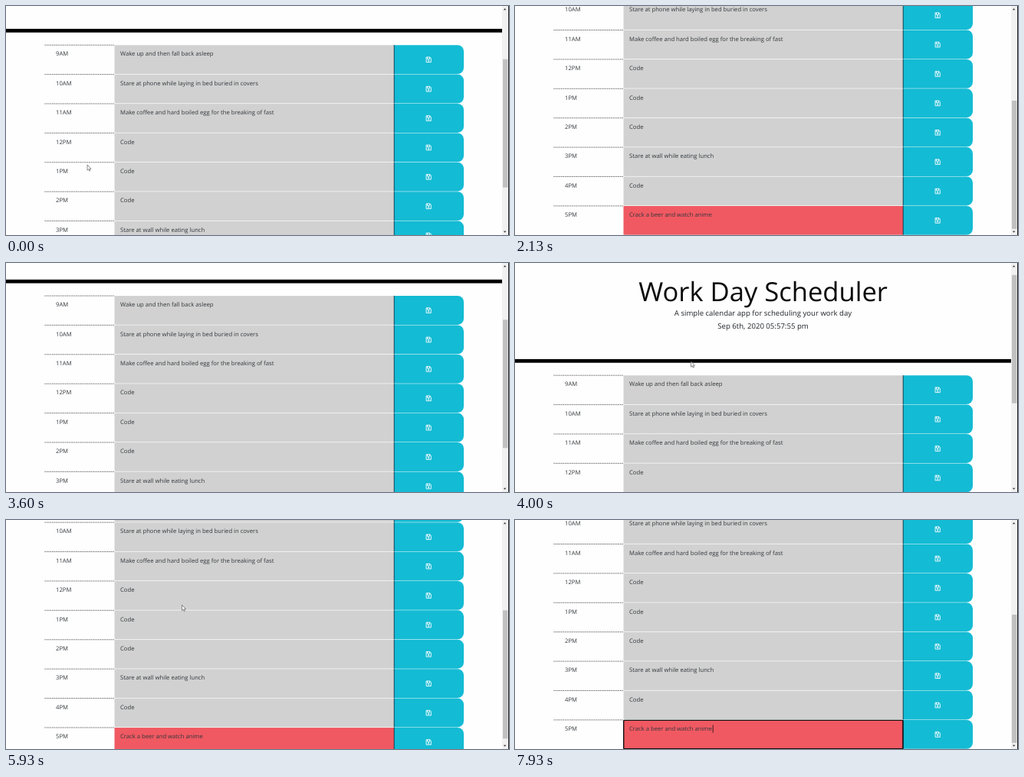
Write an HTML page that moves like this. It is 656 by 300 pixels and loops after 8000 ms.

```html
<!DOCTYPE html>
<html lang="en">
<head>
<meta charset="utf-8">
<title>Work Day Scheduler</title>
<style>
  html, body { margin: 0; width: 100%; height: 100%; overflow: hidden; background: #fefefe; }
  svg { display: block; }
  text { font: 7.68px "Open Sans", sans-serif; fill: #33373b; text-rendering: geometricPrecision; }
  .mid { text-anchor: middle; font-size: 9.6px; fill: #212529; }
  .title { font-size: 34.56px; fill: #0a0a0a; }
</style>
</head>
<body>
<svg width="656" height="300" viewBox="0 0 656 300">
  <defs>
    <g id="save" fill="none" stroke="#fff" stroke-width=".9">
      <path d="M-3.1-3.3H1.7L3.1-1.9V3.3H-3.1Z" stroke-linejoin="round"/>
      <path d="M-1.7-3.2V-.9H1.3V-3.2"/>
      <circle cy="1.2" r=".8"/>
    </g>
  </defs>
  <g id="page">
    <text class="mid title" x="323.5" y="-97">Work Day Scheduler</text>
    <text class="mid" x="323.5" y="-78">A simple calendar app for scheduling your work day</text>
    <text class="mid" x="323.5" y="-60.8" id="clock"></text>
    <rect y="-21" width="647" height="4.8"/>
    <g id="rows"></g>
    <g id="focus" transform="translate(0 307.2)">
      <rect x="141.7" y=".8" width="364.2" height="37.2" rx="1" fill="none" stroke="#111" stroke-width="1.4"/>
      <path id="caret" d="M258.2 7V17" stroke="#111" stroke-width=".8"/>
    </g>
  </g>
  <rect x="647" width="9" height="300" fill="#f1f1f1"/>
  <rect id="thumb" x="648" width="6.3" height="168" fill="#c1c1c1"/>
  <path d="M648.8 5.2L650.6 3L652.4 5.2ZM648.8 294.8L650.6 297L652.4 294.8Z" fill="#444"/>
  <rect x="655" width="1" height="300" fill="#222"/>
  <path id="mouse" d="M0 0V7.2L1.7 5.7L2.8 8.2L3.9 7.7L2.8 5.3H5Z" fill="#fff" stroke="#444" stroke-width=".6"/>
</svg>
<script>
const $ = id => document.getElementById(id);
const ROW = 38.4, LOOP = 8000, FPS = 15;
const TOP = 146.9, MIDDLE = 50.4, BOTTOM = -45.6; // resting places of the first row

const tasks = [
  'Wake up and then fall back asleep',
  'Stare at phone while laying in bed buried in covers',
  'Make coffee and hard boiled egg for the breaking of fast',
  'Code', 'Code', 'Code',
  'Stare at wall while eating lunch',
  'Code',
  'Crack a beer and watch anime'
];

$('rows').innerHTML = tasks.map((task, i) => {
  const hour = 9 + i, now = hour === 17;
  return `<g transform="translate(0 ${i * ROW})">
    <path d="M50.5 .3H141.5" stroke="#222" stroke-width=".7" stroke-dasharray="1.44 .96"/>
    <text x="65" y="14.6">${(hour + 11) % 12 + 1}${hour < 12 ? 'AM' : 'PM'}</text>
    <rect x="141.5" y=".4" width="364.5" height="37.7" fill="${now ? '#f05962' : '#d1d1d1'}"/>
    <text x="149" y="14.6">${task}</text>
    <path d="M506 .3h83a8 8 0 0 1 8 8v21.9a8 8 0 0 1 -8 8h-83Z" fill="#14bbd4"/>
    <path d="M506.2 .2V38.2" stroke="#123" stroke-width=".8"/>
    <use href="#save" x="551.2" y="19.4"/>
  </g>`;
}).join('');

// Follows eased moves { at, for, to } one after another.
function follow(from, moves, t) {
  return moves.reduce((v, m) => {
    const u = Math.min(1, Math.max(0, (t - m.at) / m.for));
    return v + (m.to - v) * (1 - Math.cos(Math.PI * u)) / 2;
  }, from);
}

const scroll = [
  { at: 0, for: 67, to: MIDDLE },
  { at: 1460, for: 340, to: BOTTOM },
  { at: 3240, for: 760, to: TOP },
  { at: 5139, for: 931, to: BOTTOM }
];
const mouseX = [
  { at: 60, for: 70, to: 240 },
  { at: 400, for: 260, to: 250 },
  { at: 2060, for: 740, to: 229.5 }
];
const mouseY = [
  { at: 60, for: 70, to: 92 },
  { at: 400, for: 260, to: 80 },
  { at: 2060, for: 740, to: 129 },
  { at: 4000, for: 500, to: 111.4 }
];

const show = (id, on) => $(id).style.display = on ? '' : 'none';
const between = (t, a, b) => t >= a && t < b;

function draw(time) {
  // The screen is sampled at a fixed rate.
  const t = Math.floor((time % LOOP + 7) * FPS / 1000) * 1000 / FPS;
  const y = follow(TOP - 96, scroll, t);
  $('page').setAttribute('transform', `translate(0 ${y})`);
  $('thumb').setAttribute('y', 98.4 - y * .5625);
  $('clock').textContent = `Sep 6th, 2020 05:57:${51 + Math.floor((t + 600) / 1000)} pm`;
  $('mouse').setAttribute('transform',
    `translate(${follow(106, mouseX, t)} ${follow(208, mouseY, t)})`);

  // The arrow is hidden while it rests on a text field.
  show('mouse', t < 90 || between(t, 450, 2060) || between(t, 3850, 6030));
  show('focus', t > 6860);
  show('caret', Math.floor((t - 6860) / 535) % 2 === 0);
}

let start;
function tick(now) {
  start ??= now;
  draw(now - start);
  requestAnimationFrame(tick);
}
requestAnimationFrame(tick);
</script>
</body>
</html>
```
